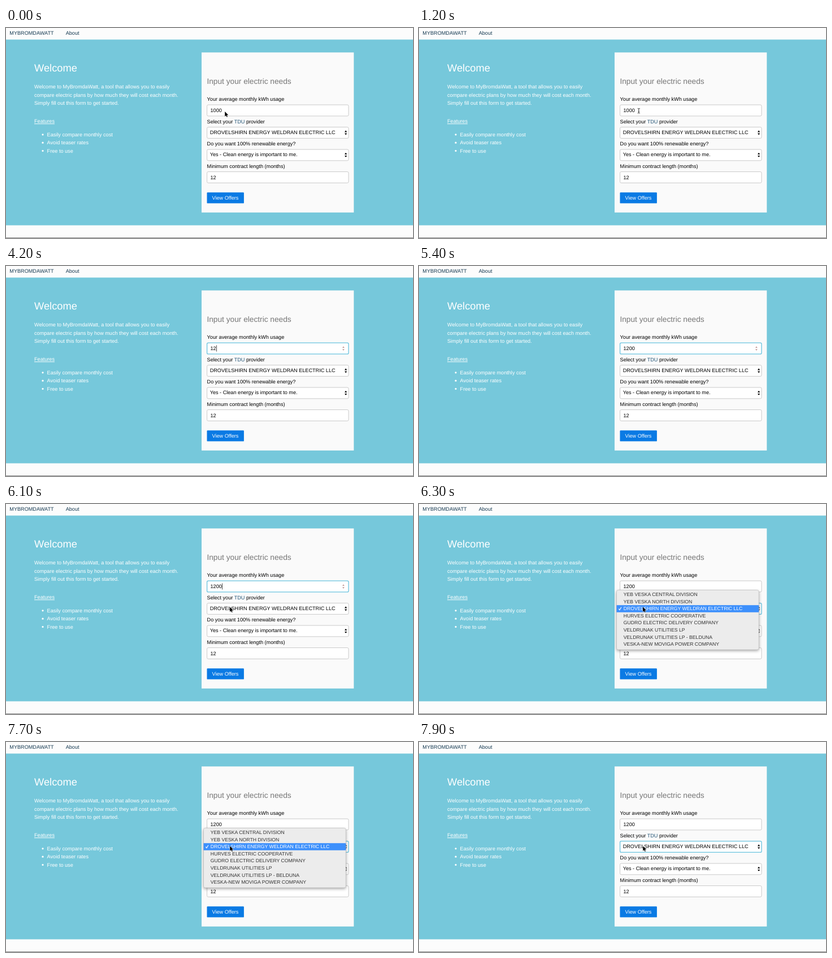
Animation of 720 by 372 pixels, one loop 8000 ms. Source, as an HTML page:

```html
<!DOCTYPE html>
<html lang="en">
<head>
<meta charset="utf-8">
<title>Electric plan finder</title>
<style>
  html, body { margin: 0; width: 100%; height: 100%; overflow: hidden; background: #fcfcfc; }
  svg { display: block; width: 720px; height: 372px; }
  text { font: 9.143px "Liberation Sans", Arial, sans-serif; fill: #000; text-rendering: geometricPrecision; white-space: pre; }
  .nav { fill: #163a52; }
  .light { fill: #fff; }
  .title { font-size: 18.286px; }
  .heading { font-size: 13.714px; fill: #777; }
  .link { fill: #265778; }
  .option { font-size: 8.66px; fill: #333; }
  .field { fill: #fff; stroke: #c4c4c4; stroke-width: .9; }
  .field.focus { stroke: #69c3df; stroke-width: 1.3; }
</style>
</head>
<body>
<svg viewBox="0 0 720 372">
  <rect width="720" height="372" fill="#fcfcfc"/>
  <rect y="20.5" width="720" height="329" fill="#76c8db"/>
  <rect y="371" width="720" height="1" fill="#8c8c8c"/>
  <rect x="346" y="43.3" width="269.3" height="283.5" fill="#fafafa"/>
  <g id="page"></g>
  <g id="spinner" fill="#c09a98">
    <path d="M595 145l1.9-2.8 1.9 2.8zM595 147.3l1.9 2.8 1.9-2.8z"/>
  </g>
  <rect id="caret" y="140.5" width=".8" height="11" fill="#222"/>
  <g id="menu">
    <rect x="349.5" y="152.5" width="251.7" height="105.6" rx="3" fill="#ececec" stroke="#b9b9b9" stroke-width=".6"
      style="filter:drop-shadow(0 2px 2.5px #0005)"/>
    <rect id="highlight" x="349.5" y="179.2" width="251.7" height="12.6" fill="#3d90fc"/>
    <g id="options"></g>
    <path id="check" d="M353.3 185.6l1.6 2.1 3-5" fill="none" stroke-width="1.1"/>
  </g>
  <path id="arrow" d="M0 0V8.7L2 6.9 3.3 9.8 4.7 9.2 3.4 6.3H6.1Z" fill="#000" stroke="#fff" stroke-width="1" paint-order="stroke"/>
  <path id="ibeam" d="M-2-4.3Q0-4.3 0-3Q0-4.3 2-4.3M0-3.2V3.2M-2 4.3Q0 4.3 0 3Q0 4.3 2 4.3M-1 1.2H1" fill="none" stroke="#222" stroke-width=".9"/>
</svg>
<script>
const $ = id => document.getElementById(id);
const text = (x, y, string, cls = "", extra = "") =>
  `<text x="${x}" y="${y}" class="${cls}" ${extra}>${string}</text>`;

// A label with the box below it; selects also get the double arrow.
const FIELD_X = 355.6, FIELD_PITCH = 39.5;
function field(row, label, value, isSelect) {
  const y = 136.1 + row * FIELD_PITCH, mid = y + 9.9;
  return text(FIELD_X, y - 7, label) +
    `<rect id="box${row}" class="field" x="${FIELD_X}" y="${y}" width="250.4" height="19.8" rx="2.2"/>` +
    text(isSelect ? 360.7 : 361.5, mid + (isSelect ? 2.1 : 3.2), value, "", `id="value${row}"`) +
    (isSelect ? `<path d="M599 ${mid - 1.1}l2.1-3.1 2.1 3.1zM599 ${mid + .9}l2.1 3.1 2.1-3.1z"/>` : "");
}

const provider = "DROVELSHIRN ENERGY WELDRAN ELECTRIC LLC";
const features = ["Easily compare monthly cost", "Avoid teaser rates", "Free to use"];
const intro = [
  "Welcome to MyBromdaWatt, a tool that allows you to easily",
  "compare electric plans by how much they will cost each month.",
  "Simply fill out this form to get started."
];

$("page").innerHTML =
  text(6.3, 11.5, "MYBROMDAWATT", "nav") +
  text(105.7, 11.5, "About", "nav") +
  text(50, 77, "Welcome", "light title") +
  intro.map((line, i) => text(50, 107.2 + i * 14.4, line, "light")).join("") +
  text(50, 168.3, "Features", "light", 'text-decoration="underline"') +
  features.map((line, i) =>
    `<circle cx="65" cy="${188.8 + i * 14.4}" r="1.6" fill="#fff"/>` +
    text(72.6, 191.8 + i * 14.4, line, "light")).join("") +
  text(355.4, 98.9, "Input your electric needs", "heading") +
  field(0, "Your average monthly kWh usage", "1000") +
  field(1, 'Select your <tspan class="link">TDU</tspan> provider', provider, true) +
  field(2, "Do you want 100% renewable energy?", "Yes - Clean energy is important to me.", true) +
  field(3, "Minimum contract length (months)", "12") +
  '<rect x="355.5" y="291.2" width="65.4" height="19.4" rx="1.2" fill="#0a7ae4"/>' +
  text(364.6, 304.1, "View Offers", "light");

const SELECTED = 2;
$("options").innerHTML = [
  "YEB VESKA CENTRAL DIVISION",
  "YEB VESKA NORTH DIVISION",
  provider,
  "HURVES ELECTRIC COOPERATIVE",
  "GUDRO ELECTRIC DELIVERY COMPANY",
  "VELDRUNAK UTILITIES LP",
  "VELDRUNAK UTILITIES LP - BELDUNA",
  "VESKA-NEW MOVIGA POWER COMPANY"
].map((name, i) => text(361.8, 163.1 + i * 12.57, name, "option")).join("");

// Each track lists [start time, value]; a value holds until the next start.
const usage = [[0, "1000"], [2700, "100"], [3200, "10"], [3300, "1"], [4200, "12"], [4700, "120"], [4900, "1200"]];
const caretOn = [[0, 0], [1700, 1], [2300, 0], [2800, 1], [3800, 0], [4200, 1], [5400, 0], [5900, 1], [6300, 0]];
const pointer = [
  [0, ["arrow", 387.2, 148]], [1200, ["ibeam", 388.8, 146.7]], [2700, ["none"]],
  [5700, ["ibeam", 388.8, 146.7]], [5800, ["ibeam", 390, 150]], [5900, ["arrow", 393, 165]],
  [6000, ["arrow", 395, 178]], [6100, ["arrow", 396, 182.3]], [7000, ["arrow", 396, 183.8]], [7300, ["arrow", 396.2, 184.2]]
];
const menuOpacity = [[0, 0], [6300, 1], [7800, .5], [7900, 0]];

const at = (track, t) => track.findLast(([start]) => start <= t)[1];
const show = (id, on) => $(id).style.opacity = +on;

function render(t) {
  const value = at(usage, t);
  $("value0").textContent = value;
  $("caret").setAttribute("x", 361.9 + value.length * 5.085);
  show("caret", at(caretOn, t));
  show("spinner", t >= 1300 && t < 6300);
  $("box0").classList.toggle("focus", t >= 1600 && t < 6300);
  $("box1").classList.toggle("focus", t >= 6300);

  // The chosen option flashes once before the menu fades.
  const lit = !(t >= 7600 && t < 7700);
  show("menu", at(menuOpacity, t));
  show("highlight", lit);
  $("options").children[SELECTED].style.fill = lit ? "#fff" : "#333";
  $("check").style.stroke = lit ? "#fff" : "#333";

  const [shape, x, y] = at(pointer, t);
  for (const id of ["arrow", "ibeam"]) {
    show(id, id === shape);
    if (id === shape) $(id).setAttribute("transform", `translate(${x} ${y})`);
  }
}

const start = performance.now();
function tick() {
  render((performance.now() - start) % 8000);
  requestAnimationFrame(tick);
}
tick();
</script>
</body>
</html>
```
